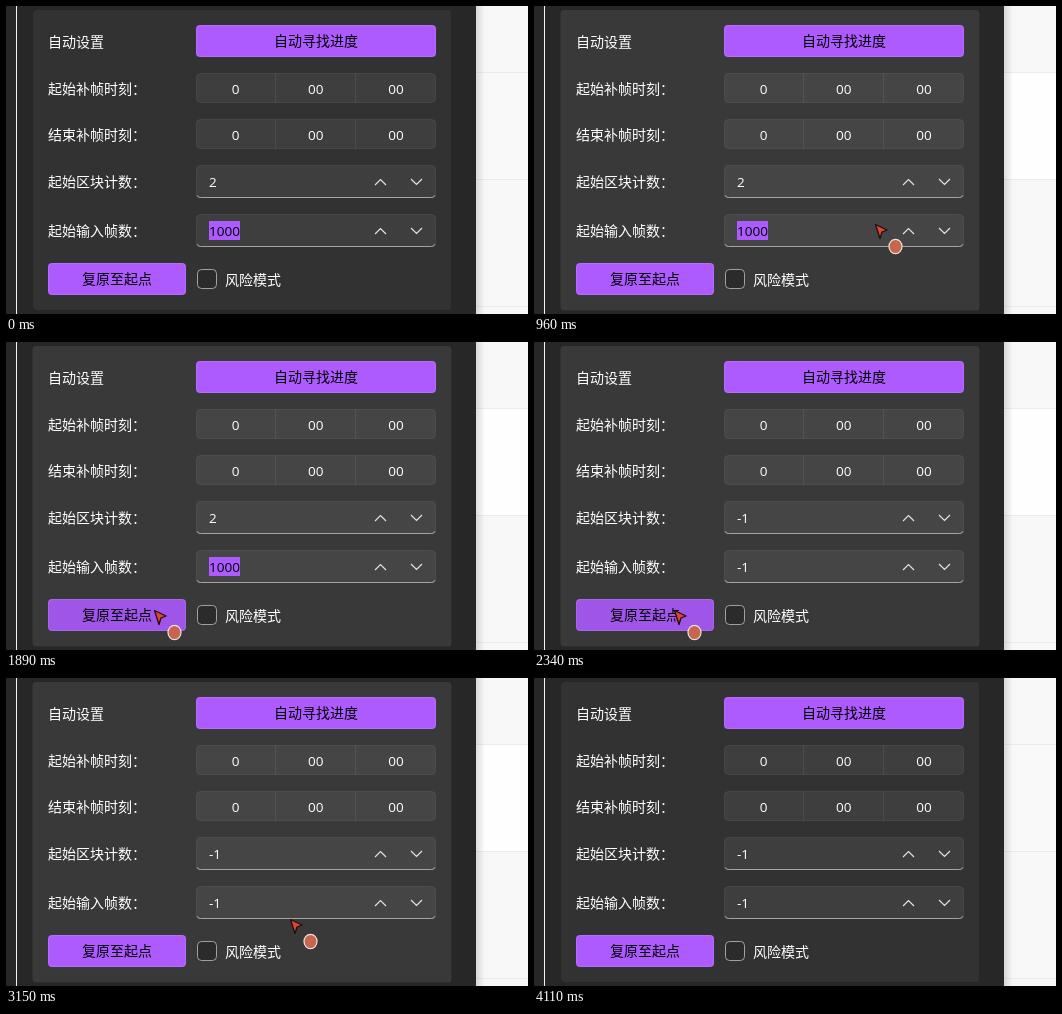
Recreate the animation shown at these times as an HTML page. Size 522 by 308 pixels, loop 5.13 s.

```html
<!DOCTYPE html>
<html lang="zh-CN">
<head>
<meta charset="utf-8">
<title>设置面板</title>
<style>
html, body { margin: 0; width: 100%; height: 100%; overflow: hidden; background: #272727; }
svg { display: block; width: 522px; height: 308px; }
text { font: 14px "Noto Sans CJK SC", "Noto Sans CJK", sans-serif; fill: #fff; }
.num { font: 13.5px "Open Sans", "Noto Sans", sans-serif; }
.dark { fill: #000; }
.mid { text-anchor: middle; }
.field { fill: #fff; fill-opacity: .06; stroke: #fff; stroke-opacity: .07; }
.icon { fill: none; stroke: #e2e2e2; stroke-width: 1.2; }
</style>
</head>
<body>
<svg id="stage" viewBox="0 0 522 308" xmlns="http://www.w3.org/2000/svg">
  <defs>
    <linearGradient id="shade">
      <stop offset="0" stop-color="#000" stop-opacity=".13"/>
      <stop offset="1" stop-color="#000" stop-opacity="0"/>
    </linearGradient>
  </defs>
  <rect width="522" height="308" fill="#272727"/>
  <rect x="10" width="1" height="308" fill="#f2f2f2"/>
  <rect x="470" width="52" height="308" fill="#f8f8f8"/>
  <rect id="row" x="470" y="67" width="52" height="106"/>
  <path d="M470 66.5h52M470 173.5h52M470 300.5h52" stroke="#ebebeb"/>
  <rect x="470" width="9" height="308" fill="url(#shade)"/>
  <rect id="card" rx="4"/>
  <g id="ui"></g>
  <g id="pointer">
    <path d="M0.5 0.5L12 6L7 8L5 14.5Z" fill="#e0452f" stroke="#1c1010" stroke-width="1.3" stroke-linejoin="round"/>
    <ellipse cx="20.5" cy="22.5" rx="6.5" ry="7.2" fill="#c8654f" stroke="#efe3dc" stroke-width="1.2"/>
  </g>
</svg>
<script>
const LOOP = 5130, STEP = 30;
const ACCENT = '#ad5bff', ACCENT_HOVER = '#9f56e8', ACCENT_PRESSED = '#904fcf';
const $ = id => document.getElementById(id);

function add(tag, attrs, content = '') {
  const el = document.createElementNS('http://www.w3.org/2000/svg', tag);
  for (const name in attrs) el.setAttribute(name, attrs[name]);
  el.textContent = content;
  $('ui').appendChild(el);
  return el;
}

const box = (x, y, width, height, attrs) => add('rect', { x, y, width, height, rx: 4, ...attrs });
const label = (x, y, s, cls = '') => add('text', { x, y: y + 5, class: cls }, s);

function button(x, y, w, s) {
  const face = box(x, y, w, 32, { fill: ACCENT });
  box(x + .5, y + .5, w - 1, 31, { fill: 'none', stroke: '#fff', 'stroke-opacity': .1 });
  return { face, caption: label(x + w / 2, y + 16, s, 'mid dark') };
}

function timeRow(y, s) {
  label(42, y, s);
  box(190.5, y - 15.5, 239, 29, { class: 'field' });
  add('path', { d: `M269.5 ${y - 15}v28M349.5 ${y - 15}v28`, stroke: '#fff', 'stroke-opacity': .07 });
  ['0', '00', '00'].forEach((n, i) => label(229.5 + 80.2 * i, y, n, 'num mid'));
}

function spinRow(y, s) {
  label(42, y, s);
  box(190.5, y - 16.5, 239, 32, { class: 'field' });
  add('path', { d: `M190.8 ${y + 13}q.7 2.5 3.5 2.5h231.4q2.8 0 3.5-2.5`, fill: 'none', stroke: '#a4a4a4' });
  add('path', { d: `M369 ${y + 3}l5.5-5.5l5.5 5.5M405 ${y - 3}l5.5 5.5l5.5-5.5`, class: 'icon' });
  const mark = add('rect', { x: 203, y: y - 10, width: 31, height: 19, fill: ACCENT });
  return { mark, value: label(203, y, '', 'num') };
}

label(42, 36, '自动设置');
button(190, 19, 240, '自动寻找进度');
timeRow(83, '起始补帧时刻：');
timeRow(129, '结束补帧时刻：');
const blocks = spinRow(176, '起始区块计数：');
const frames = spinRow(225, '起始输入帧数：');
blocks.mark.setAttribute('visibility', 'hidden');
const reset = button(42, 257, 138, '复原至起点');
box(191.5, 263.5, 19, 19, { fill: '#2b2b2b', stroke: '#a2a2a2' });
label(219, 274, '风险模式');

// Pointer keys: time, x, y
const path = [
  [540, 530, 108], [570, 516, 112], [720, 442, 146], [1080, 284, 248],
  [1230, 183, 269], [1500, 150.5, 268], [1860, 150.5, 268], [1890, 147.5, 268],
  [1950, 139.5, 268], [2820, 139.5, 268], [3150, 284, 241], [3360, 511, 145], [3450, 526, 145]
];

const slope = (i, k) => (path[i + 1][k] - path[i][k]) / (path[i + 1][0] - path[i][0]);

function tangent(i, k) {
  if (i === 0 || i === path.length - 1) return 0;
  const a = slope(i - 1, k), b = slope(i, k);
  return a * b <= 0 ? 0 : 2 * a * b / (a + b);
}

// Monotone cubic through the keys
function along(t, k) {
  let i = 0;
  while (i < path.length - 2 && t >= path[i + 1][0]) i++;
  const [p, q] = [path[i], path[i + 1]];
  const dt = q[0] - p[0], u = Math.min(1, Math.max(0, (t - p[0]) / dt)), v = 1 - u;
  return p[k] * (1 + 2 * u) * v * v + tangent(i, k) * dt * u * v * v +
    q[k] * u * u * (3 - 2 * u) - tangent(i + 1, k) * dt * u * u * v;
}

function draw(time) {
  const t = Math.floor((time % LOOP) / STEP) * STEP;
  const x = Math.round(along(t, 1)), y = Math.round(along(t, 2));
  const shown = t >= 570 && t < 3450;
  const over = shown && x < 441;
  const overReset = over && x >= 42 && x < 180 && y >= 257 && y < 289;
  const pressed = t >= 2190 && t < 2340;
  const done = t >= 2340;

  $('pointer').setAttribute('visibility', shown ? 'visible' : 'hidden');
  $('pointer').setAttribute('transform', `translate(${x} ${y})`);

  const grow = over ? .5 : 0, card = $('card');
  card.setAttribute('x', 27 - grow);
  card.setAttribute('y', 4);
  card.setAttribute('width', 418 + 2 * grow);
  card.setAttribute('height', 300 + grow);
  card.setAttribute('fill', over ? '#393939' : '#323232');
  $('row').setAttribute('fill', over ? '#fefefe' : '#f9f9f9');

  reset.face.setAttribute('fill', pressed ? ACCENT_PRESSED : overReset ? ACCENT_HOVER : ACCENT);
  reset.caption.setAttribute('fill-opacity', pressed ? .6 : 1);

  blocks.value.textContent = done ? '-1' : '2';
  frames.value.textContent = done ? '-1' : '1000';
  frames.value.setAttribute('class', done ? 'num' : 'num dark');
  frames.mark.setAttribute('visibility', done ? 'hidden' : 'visible');
}

const start = performance.now();
function tick() {
  draw(performance.now() - start);
  requestAnimationFrame(tick);
}
tick();
</script>
</body>
</html>
```
